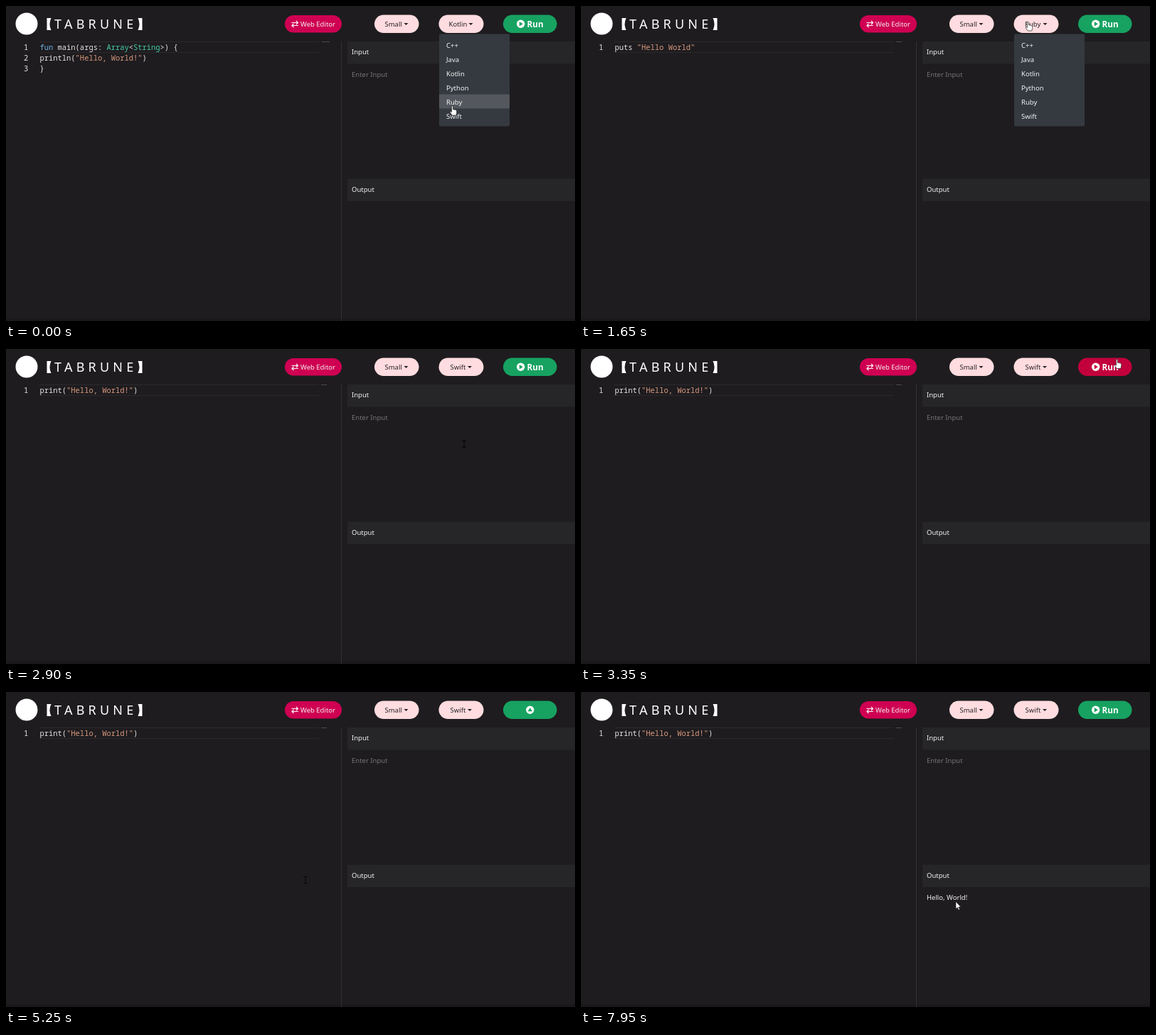
Animation of 800 by 444 pixels, one loop 8 s. Source, as an HTML page:

```html
<!DOCTYPE html>
<html lang="en">
<head>
<meta charset="utf-8">
<title>Code editor</title>
<style>
  html, body { margin: 0; width: 100%; height: 100%; overflow: hidden; background: #1e1c1f; }
  svg { display: block; width: 100vw; height: 100vh; font: 9.5px "Noto Sans", "Open Sans", sans-serif; fill: #f4f4f4; }
  .code { font: 10.45px "Noto Sans Mono", "DejaVu Sans Mono", monospace; white-space: pre; fill: #e4e4e4; }
  .kw { fill: #6fb3e6; }
  .type { fill: #45cda6; }
  .str { fill: #d99a7e; }
  .pill { fill: #ffdcdf; }
  .dark { fill: #242225; }
</style>
</head>
<body>
<svg viewBox="0 0 800 444">
  <rect width="800" height="444" fill="#1e1c1f"/>
  <rect y="440" width="800" height="4" fill="#1a181b"/>

  <circle cx="29" cy="25" r="15.5" fill="#fff"/>
  <path d="M57.500 17h6q-4 8.500 0 17h-6zM191.500 17h-6q4 8.500 0 17h6z" fill="#fff"/>
  <text x="68" y="32" font-size="18" letter-spacing="5.2" fill="#fff">TABRUNE</text>

  <rect x="392" y="13" width="80" height="24.500" rx="12.250" fill="#cf0052"/>
  <path d="M401.500 23.500h9m-2.500-2.500 2.500 2.500-2.500 2.500M411 27.500h-9m2.500-2.500-2.500 2.500 2.500 2.500" fill="none" stroke="#fff" stroke-width="1.200"/>
  <text x="414" y="29">Web Editor</text>

  <rect class="pill" x="518" y="12.500" width="62.500" height="25.500" rx="12.750"/>
  <text class="dark" x="532.500" y="29">Small</text>
  <path class="dark" d="M559.500 24h6l-3 3z"/>

  <rect class="pill" x="608.500" y="12.500" width="63" height="25.500" rx="12.750"/>
  <text class="dark" id="lang" y="29"></text>
  <path class="dark" id="caret" d="M0 24h6l-3 3z"/>

  <rect id="run" x="699" y="12.500" width="75.500" height="25.500" rx="12.750"/>
  <g id="icon">
    <circle r="5.700" fill="#fff"/>
    <path id="play" d="M-1.900-3.200v6.400l5-3.200z"/>
  </g>
  <text id="runText" x="732.500" y="30" font-size="11.7" font-weight="700" fill="#fff">Run</text>

  <path d="M47 50.500h393M47 65.500h393" stroke="#2b292c"/>
  <path id="map" d="M443 50.500h9" stroke="#4a494c"/>
  <g id="code" class="code"></g>

  <path d="M471.500 50v394" stroke="#313033"/>
  <path d="M480 50h320v31.500h-320zM480 243.500h320v31.500h-320z" fill="#262527"/>
  <text x="486" y="68">Input</text>
  <text x="486" y="100" fill="#757477">Enter Input</text>
  <text x="486" y="261.500">Output</text>
  <text id="out" x="486" y="293">Hello, World!</text>

  <g id="menu">
    <rect x="609" y="39.500" width="99" height="130" rx="2" fill="#343a40"/>
    <rect id="row" x="609" width="99" height="20" fill="#54575d"/>
  </g>

  <path id="hand" fill="#fff" stroke="#222" stroke-width=".7" d="M-1 .8Q0-.6 1 .8V5Q2 4.200 2.900 5.200 3.900 4.600 4.700 5.700 6 5.300 6.200 6.700V9.500L5.300 13H-.3L-3.100 8.900Q-3.500 7.200-2.200 7.500L-1 8.700z"/>
  <path id="arrow" fill="#fff" stroke="#222" stroke-width=".6" d="M0 0V10.200L2.300 8.100 3.900 11.700 5.500 11 3.900 7.500H7z"/>
  <path id="beam" fill="none" stroke="#060606" stroke-width="1.100" d="M-3-5Q-.5-5 0-4 .5-5 3-5M0-4V4M-3 5Q-.5 5 0 4 .5 5 3 5"/>
</svg>
<script>
const LOOP = 8000;
const $ = id => document.getElementById(id);
const span = (cls, s) => `<tspan class="${cls}">${s}</tspan>`;
const show = (id, on) => $(id).setAttribute('display', on ? 'inline' : 'none');
const set = (id, attrs) => {
  for (const k in attrs) $(id).setAttribute(k, attrs[k]);
};

const LANGS = {
  Kotlin: { x: 622.5, caret: 650.5, lines: [
    `${span('kw', 'fun')} main(args: ${span('type', 'Array')}&lt;${span('type', 'String')}&gt;) {`,
    `    println(${span('str', '"Hello, World!"')})`,
    '}'] },
  Ruby: { x: 624, caret: 649.5, lines: [`puts ${span('str', '"Hello World"')}`] },
  Swift: { x: 624.5, caret: 649, lines: [`print(${span('str', '"Hello, World!"')})`] }
};

// Moments in the session, in ms
const PICK_RUBY = 450, REOPEN = 1500, PICK_SWIFT = 2650;
const HOVER_IN = 3110, HOVER_OUT = 3850, RUN = 3750, DONE = 6100;

// Pointer hot spot: time, x, y
const TRACK = [
  [0, 627.5, 141], [650, 627.5, 141], [1250, 628.5, 22], [1700, 628.5, 22],
  [2250, 628, 152], [2800, 628, 152], [3250, 753.5, 14.5], [3700, 753.5, 14.5],
  [4250, 560, 238], [4850, 421, 265], [6120, 421, 265], [6550, 600, 270],
  [6700, 600, 270], [7500, 556, 311], [7700, 556, 311], [7950, 527, 295.5], [8000, 527, 295.5]
];

const ramp = (t, a, b) => Math.min(1, Math.max(0, (t - a) / (b - a)));
const ease = u => u * u * (3 - 2 * u);
const mix = (a, b, u) => a + (b - a) * u;

function pointerAt(t) {
  const i = TRACK.findIndex(p => p[0] > t);
  const a = TRACK[i - 1], b = TRACK[i];
  const u = ease(ramp(t, a[0], b[0]));
  return [mix(a[1], b[1], u), mix(a[2], b[2], u)];
}

function pointerKind(x, y, open) {
  const inMenu = open && x > 609 && x < 708 && y > 39 && y < 170;
  const onButton = y > 12 && y < 38 && (x > 608 && x < 672 || x > 699 && x < 775);
  if (inMenu || onButton) return 'hand';
  const inEditor = x < 471 && y > 50;
  const inField = x > 480 && y > 82 && y < 243;
  return inEditor || inField ? 'beam' : 'arrow';
}

let current;
function setLang(name) {
  if (name === current) return;
  current = name;
  const { x, caret, lines } = LANGS[name];
  $('lang').textContent = name;
  set('lang', { x });
  set('caret', { transform: `translate(${caret})` });
  set('map', { d: name === 'Kotlin' ? 'M444 50.5h11' : 'M443 50.5h8' });
  $('code').innerHTML = lines.map((line, i) => {
    const y = 61.5 + i * 15;
    return `<text x="25" y="${y}">${i + 1}</text><text x="47.5" y="${y}">${line}</text>`;
  }).join('');
}

function draw(t) {
  const [x, y] = pointerAt(t);
  const open = t < PICK_RUBY || t >= REOPEN && t < PICK_SWIFT;
  const busy = t >= RUN && t < DONE;

  setLang(t < PICK_RUBY ? 'Kotlin' : t < PICK_SWIFT ? 'Ruby' : 'Swift');

  const row = Math.floor((y - 45) / 20);
  show('menu', open);
  show('row', row >= 0 && row < 6);
  set('row', { y: 45 + row * 20 - 0.5 });

  const hot = ramp(t, HOVER_IN, HOVER_IN + 150) - ramp(t, HOVER_OUT, HOVER_OUT + 150);
  const fill = `rgb(${mix(23, 194, hot)},${mix(162, 0, hot)},${mix(97, 60, hot)})`;
  set('run', { fill });
  set('play', { fill });
  const spin = busy ? (t - RUN) * 0.18 : 0;
  set('icon', { transform: `translate(${busy ? 736.8 : 723.7} 25.3) rotate(${spin})` });
  show('runText', !busy);
  show('out', t >= DONE);

  const kind = pointerKind(x, y, open);
  for (const id of ['hand', 'arrow', 'beam']) show(id, id === kind);
  set(kind, { transform: `translate(${x} ${y})` });
}

['C++', 'Java', 'Kotlin', 'Python', 'Ruby', 'Swift'].forEach((name, i) => {
  $('menu').insertAdjacentHTML('beforeend', `<text x="619" y="${59 + i * 20}">${name}</text>`);
});

const start = performance.now();
function tick() {
  draw((performance.now() - start) % LOOP);
  requestAnimationFrame(tick);
}
tick();
</script>
</body>
</html>
```
